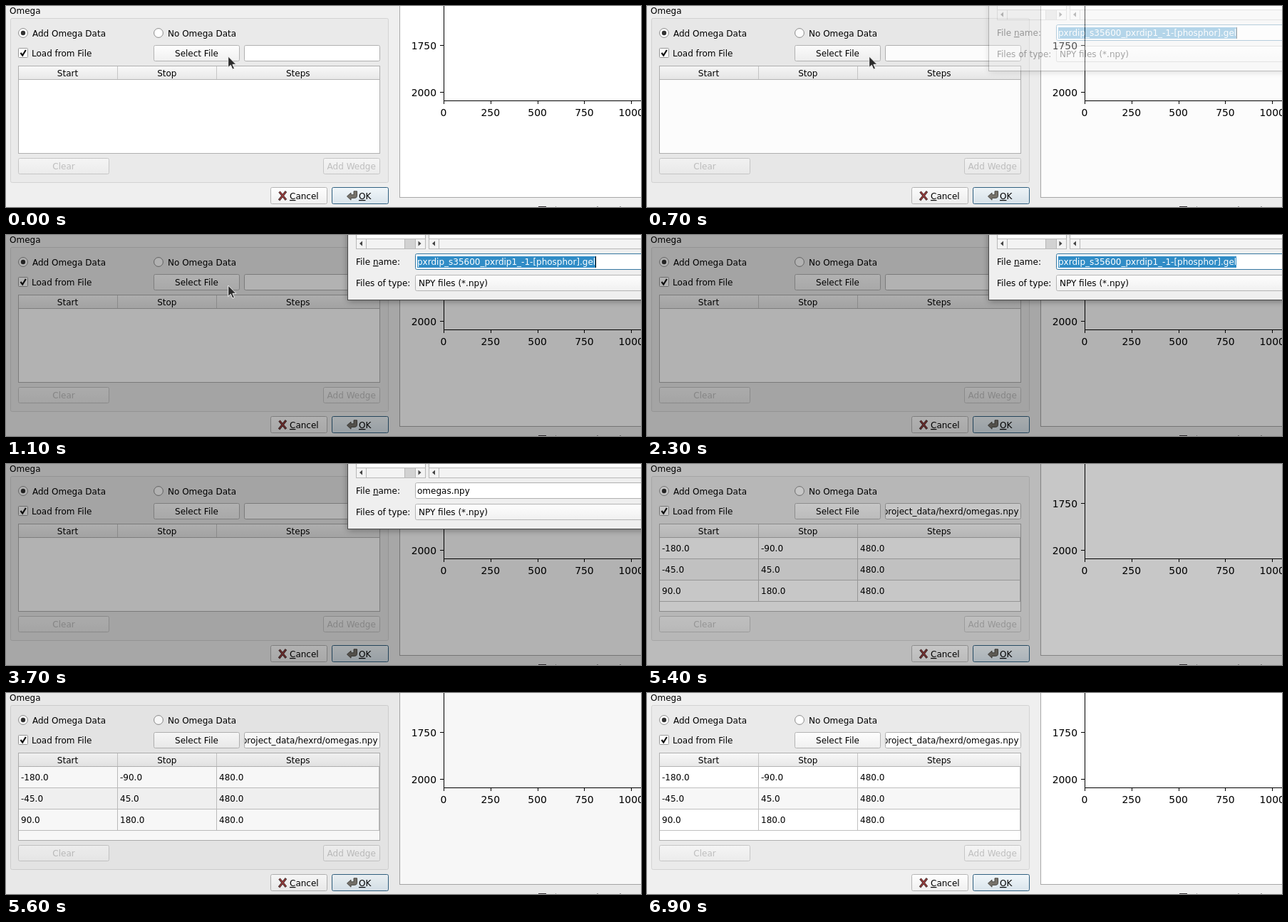
These frames come from a looping animation (891 px wide and 283 px high, 8.4 s). An HTML page:

```html
<!DOCTYPE html>
<html lang="en">
<head>
<meta charset="utf-8">
<title>Omega data dialog</title>
<style>
  html, body { margin: 0; width: 100%; height: 100%; overflow: hidden; background: #efefef; }
  svg { display: block; width: 891px; height: 283px; }
  text { font: 12px "DejaVu Sans", sans-serif; white-space: pre; }
  .tick { font-size: 13.9px; }
  .off { fill: #bebebe; }
  .mid { text-anchor: middle; }
  .end { text-anchor: end; }
  .key { text-decoration: underline; }
  .sel { fill: #fff; }
</style>
</head>
<body>
<svg id="stage" viewBox="0 0 891 283">
  <defs>
    <linearGradient id="btn" x2="0" y2="1"><stop stop-color="#fefefe"/><stop offset="1" stop-color="#f0f0f0"/></linearGradient>
    <linearGradient id="dis" x2="0" y2="1"><stop stop-color="#f5f5f5"/><stop offset="1" stop-color="#ebebeb"/></linearGradient>
    <linearGradient id="def" x2="0" y2="1"><stop stop-color="#f1f7fa"/><stop offset="1" stop-color="#d9e4ec"/></linearGradient>
    <linearGradient id="head" x2="0" y2="1"><stop stop-color="#f8f8f8"/><stop offset="1" stop-color="#e8e8e8"/></linearGradient>
    <clipPath id="fieldClip"><path d="M335 56h189v21h-189z"/></clipPath>
    <filter id="shadow" x="-10%" y="-30%" width="120%" height="160%"><feGaussianBlur stdDeviation="5"/></filter>
  </defs>
  <g id="window"></g>
  <rect id="dim" width="891" height="283"/>
  <g id="dialog"></g>
  <path id="pointer" d="M311.7 71v15.6l3.6-3.4 2.6 6 2.6-1.2-2.6-5.7h5z" fill="#2b2b2b" stroke="#f4f4f4" stroke-width="1"/>
</svg>
<script>
const LOOP = 8400;
const $ = id => document.getElementById(id);

// Drawing helpers; edges are placed on whole pixels
const box = (x0, y0, x1, y1, fill, stroke, r = 0, extra = '') =>
  `<rect x="${x0 + .5}" y="${y0 + .5}" width="${x1 - x0 - 1}" height="${y1 - y0 - 1}" rx="${r}" fill="${fill}" stroke="${stroke}" ${extra}/>`;
const fill = (x0, y0, x1, y1, color, extra = '') =>
  `<rect x="${x0}" y="${y0}" width="${x1 - x0}" height="${y1 - y0}" fill="${color}" ${extra}/>`;
const text = (x, y, str, cls = '', extra = '') =>
  `<text x="${x}" y="${y}" class="${cls}" ${extra}>${str}</text>`;
const key = c => `<tspan class="key">${c}</tspan>`;
const group = (id, body) => `<g id="${id}">${body}</g>`;
const shape = (d, color) => `<path d="${d}" fill="${color}"/>`;

const radio = (x, y, on) =>
  `<circle cx="${x}" cy="${y}" r="6.4" fill="#fff" stroke="#8b8b8b"/>` +
  (on ? `<circle cx="${x}" cy="${y}" r="3.2" fill="#333"/>` : '');

const GRAY = '#b4b4b4';
const columns = [[17, 'Start'], [156, 'Stop'], [295, 'Steps'], [524]];

function omegaPanel() {
  const header = columns.slice(0, 3).map(([x, name], i) => {
    const next = columns[i + 1][0];
    return text((x + next) / 2 + (i ? .3 : 0), 99, name, 'mid') +
      (i ? fill(x, 85, x + 1, 103, '#c6c6c6') : '');
  }).join('');
  return text(5, 11, 'Omega') +
    box(6, 17, 537, 249, '#eaeaea', '#d3d3d3', 2) +
    radio(24, 38, true) + text(37, 43, 'Add Omega Data') +
    radio(214, 38, false) + text(227, 43, 'No Omega Data') +
    box(17, 59, 31, 73, '#fff', '#9a9a9a', 1) +
    '<path d="M20.5 66l2.7 3.6 4.6-7.6" fill="none" stroke="#111" stroke-width="2.2"/>' +
    text(36, 71, 'Load from File') +
    box(207, 55, 328, 78, 'url(#btn)', GRAY, 2) +
    fill(208, 56, 327, 77, '#d8d8d8', 'id="pressed"') +
    text(267.5, 71, 'Select File', 'mid') +
    box(334, 55, 525, 78, '#fff', '#b0b0b0', 2) +
    box(17, 84, 525, 208, '#fff', '#b0b0b0') +
    fill(18, 85, 524, 103, 'url(#head)') + fill(18, 103, 524, 104, GRAY) + header +
    box(17, 214, 145, 237, 'url(#dis)', '#c6c6c6', 2) + text(81, 230, 'Clear', 'off mid') +
    box(445, 214, 525, 237, 'url(#dis)', '#c6c6c6', 2) + text(484.7, 230, 'Add Wedge', 'off mid');
}

function loadedData() {
  const rows = [['-180.0', '-90.0'], ['-45.0', '45.0'], ['90.0', '180.0']];
  const cells = rows.map(([start, stop], i) => {
    const top = 104 + 30 * i;
    return (i % 2 ? fill(18, top, 523, top + 29, '#f7f7f7') : '') +
      fill(18, top + 29, 524, top + 30, '#c0c0c0') +
      [start, stop, '480.0'].map((v, c) => text(columns[c][0] + 4, top + 19, v)).join('');
  }).join('');
  const lines = [156, 295, 523].map(x => fill(x, 104, x + 1, 194, '#c0c0c0')).join('');
  return cells + lines +
    `<g clip-path="url(#fieldClip)">${text(521.5, 71, 'project_data/hexrd/omegas.npy', 'end')}</g>`;
}

function buttons() {
  return box(371, 255, 451, 279, 'url(#btn)', GRAY, 2) +
    '<path d="M383.5 261.5l9.5 11.5M393 261l-10 12.5" stroke="#4c3535" stroke-width="3.2"/>' +
    '<path d="M384 261.8l8.6 10.4M392.4 261.8l-8.6 10.8" stroke="#9c3b3b" stroke-width="1.5"/>' +
    text(398, 272, key('C') + 'ancel') +
    box(457, 255, 537, 279, 'url(#def)', '#306080', 2) +
    '<path d="M478.5 268l5.5-5v2.8h4v-5h4.5v6.6q0 3-3.5 3h-5v2.8z" fill="#77736b" stroke="#4c4a46"/>' +
    text(495, 272, key('O') + 'K');
}

function plot() {
  const step = 65.8;
  let out = box(552, -2, 900, 270, '#fff', '#a8a8a8') +
    fill(614, 0, 615, 134, '#000') + fill(614, 133, 891, 134, '#000');
  for (let i = 0; i < 5; i++) {
    const x = Math.round(614 + step * i);
    out += fill(x, 134, x + 1, 138, '#000') + text(614 + step * i, 155, 250 * i, 'tick mid');
  }
  [2000, 1750].forEach((v, i) => {
    const y = Math.round(121 - step * i);
    out += fill(609, y, 614, y + 1, '#000') + text(604, y + 6, v, 'tick end');
  });
  return out + fill(747, 282, 758, 283, '#332e33') +
    [[771, 1], [829, 2], [861, 2]].map(([x, w]) => fill(x, 282, x + w, 283, '#999')).join('');
}

function scrollBars() {
  const left = x => shape(`M${x + 2} 8.5v7l-4-3.5z`, '#444');
  return box(491, -2, 589, 20, '#fff', '#b0b0b0') +
    box(491, 5, 589, 20, '#f3f3f3', '#b8b8b8') +
    fill(505, 6, 506, 19, '#b8b8b8') + left(498) +
    box(559, 5, 575, 20, '#d2d2d2', '#b8b8b8') + shape('M578.5 8.5v7l4-3.5z', '#444') +
    box(593, -2, 900, 20, '#fff', '#b0b0b0') +
    box(593, 5, 900, 20, '#f3f3f3', '#b8b8b8') +
    fill(607, 6, 608, 19, '#b8b8b8') + left(600);
}

function fileDialog() {
  return fill(480, -20, 910, 93, '#000', 'opacity=".4" filter="url(#shadow)"') +
    box(479, -2, 900, 92, '#efefef', '#4a4a4a') +
    scrollBars() +
    text(491, 42, `File ${key('n')}ame:`) + text(491, 72, 'Files of type:') +
    box(574, 56, 900, 79, 'url(#btn)', GRAY, 2) + text(579, 72, 'NPY files (*.npy)') +
    group('oldName',
      box(574, 26, 900, 49, '#fff', '#3577a0', 2) + fill(577, 30, 827, 46, '#308cc6') +
      text(577, 42, 'pxrdip_s35600_pxrdip1_-1-[phosphor].gel', 'sel') +
      fill(827, 30, 828, 46, '#000', 'id="caret"')) +
    group('newName',
      box(574, 26, 900, 49, '#fff', '#b0b0b0', 2) + text(577, 42, 'omegas.npy'));
}

$('window').innerHTML = omegaPanel() + group('loaded', loadedData()) + buttons() + plot();
$('dialog').innerHTML = fileDialog();

// Opacity held from each listed time until the next
const timeline = {
  pressed: [[0, 0], [500, 1], [700, 0]],
  pointer: [[0, 1], [1300, 0]],
  dim: [[0, 0], [700, .01], [800, .03], [900, .09], [1000, .19], [1100, .3],
        [5400, .22], [5500, .12], [5600, .03], [5700, 0]],
  dialog: [[0, 0], [700, .35], [800, 1], [5400, 0]],
  caret: [[0, 1], [1300, 0], [1800, 1], [2300, 0], [2800, 1], [3300, 0]],
  oldName: [[0, 1], [3700, 0]],
  newName: [[0, 0], [3700, 1]],
  loaded: [[0, 0], [5400, 1]]
};

for (const [id, steps] of Object.entries(timeline)) {
  const frames = steps.map(([t, opacity]) => ({ offset: t / LOOP, opacity, easing: 'step-end' }));
  frames.push({ offset: 1, opacity: steps.at(-1)[1] });
  $(id).animate(frames, { duration: LOOP, iterations: Infinity }).startTime = 0;
}
const start = performance.now();
document.getAnimations().forEach(a => { a.startTime = start; });
</script>
</body>
</html>
```
